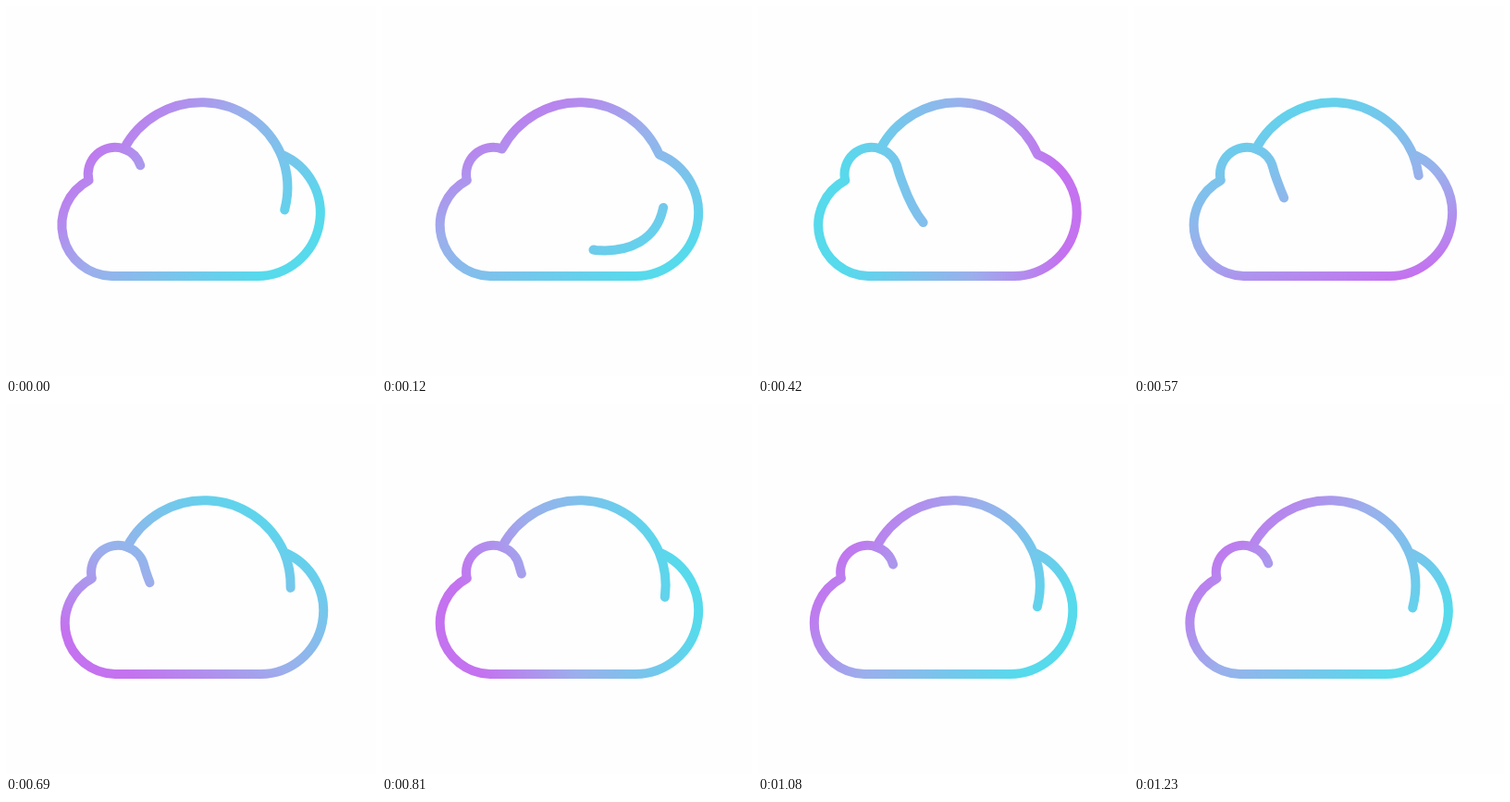
These frames come from a looping animation (400x400 px, 3260 ms). An HTML page:

```html
<!DOCTYPE html>
<html lang="en">
<head>
<meta charset="utf-8">
<title>Cloud</title>
<style>
  html, body { margin: 0; width: 100%; height: 100%; overflow: hidden; background: #fefefe; }
  svg { display: block; width: 100%; height: 100%; }
  path { fill: none; stroke: url(#tint); stroke-width: 10; stroke-linecap: round; stroke-linejoin: round; }
</style>
</head>
<body>
<svg viewBox="0 0 400 400">
  <defs>
    <linearGradient id="tint" gradientUnits="userSpaceOnUse" x1="84" y1="198" x2="320" y2="198">
      <stop offset="0" stop-color="#c472ef"/>
      <stop offset=".41" stop-color="#9bafec"/>
      <stop offset="1" stop-color="#56daec"/>
    </linearGradient>
  </defs>
  <g id="cloud">
    <path d="M89.5 188.5 A29 29 0 0 1 127.5 154.5 A94.5 94.5 0 0 1 297.4 160.5
             A68.3 68.3 0 0 1 272 292 H114.5 A55 55 0 0 1 89.5 188.5 Z"/>
    <path id="swirl" d="M297.4 160.5 A95 95 0 0 1 301.3 220 C294 252 266 267 229 264
             C182 257 164 226 151.7 192 C149 185 147.3 180 146.2 175.5 A29 29 0 0 0 127.5 154.5"/>
  </g>
</svg>
<script>
  const LOOP = 3260, MOVE = 1230, STEP = 30;
  const DASH = 98, GAP = 225.5;

  const sweep = bezier(0.2, 0.55, 0.2, 1);
  const turn = bezier(0.35, 0.1, 0.45, 0.95);
  const sway = p => Math.sin(Math.PI * (1 - (1 - p) ** 1.7));

  // CSS-style cubic-bezier easing, solved by bisection
  function bezier(x1, y1, x2, y2) {
    const at = (a, b, s) => 3 * (1 - s) ** 2 * s * a + 3 * (1 - s) * s * s * b + s ** 3;
    return x => {
      let lo = 0, hi = 1;
      for (let i = 0; i < 24; i++) {
        const mid = (lo + hi) / 2;
        if (at(x1, x2, mid) < x) lo = mid; else hi = mid;
      }
      return at(y1, y2, hi);
    };
  }

  const cloud = document.getElementById('cloud');
  const swirl = document.getElementById('swirl');
  const tint = document.getElementById('tint');
  swirl.setAttribute('stroke-dasharray', `${DASH} ${GAP}`);

  function draw(now) {
    const t = Math.floor((now % LOOP) / STEP) * STEP;
    const p = Math.min(t / MOVE, 1);
    const head = 61 + (DASH + GAP) * sweep(p);
    cloud.setAttribute('transform', `translate(${4.8 * sway(p)} 0)`);
    tint.setAttribute('gradientTransform', `rotate(${43 + 360 * turn(p)} 202 198)`);
    swirl.setAttribute('stroke-dashoffset', DASH - head);
  }

  const start = performance.now();
  function tick() {
    draw(performance.now() - start);
    requestAnimationFrame(tick);
  }
  tick();
</script>
</body>
</html>
```
